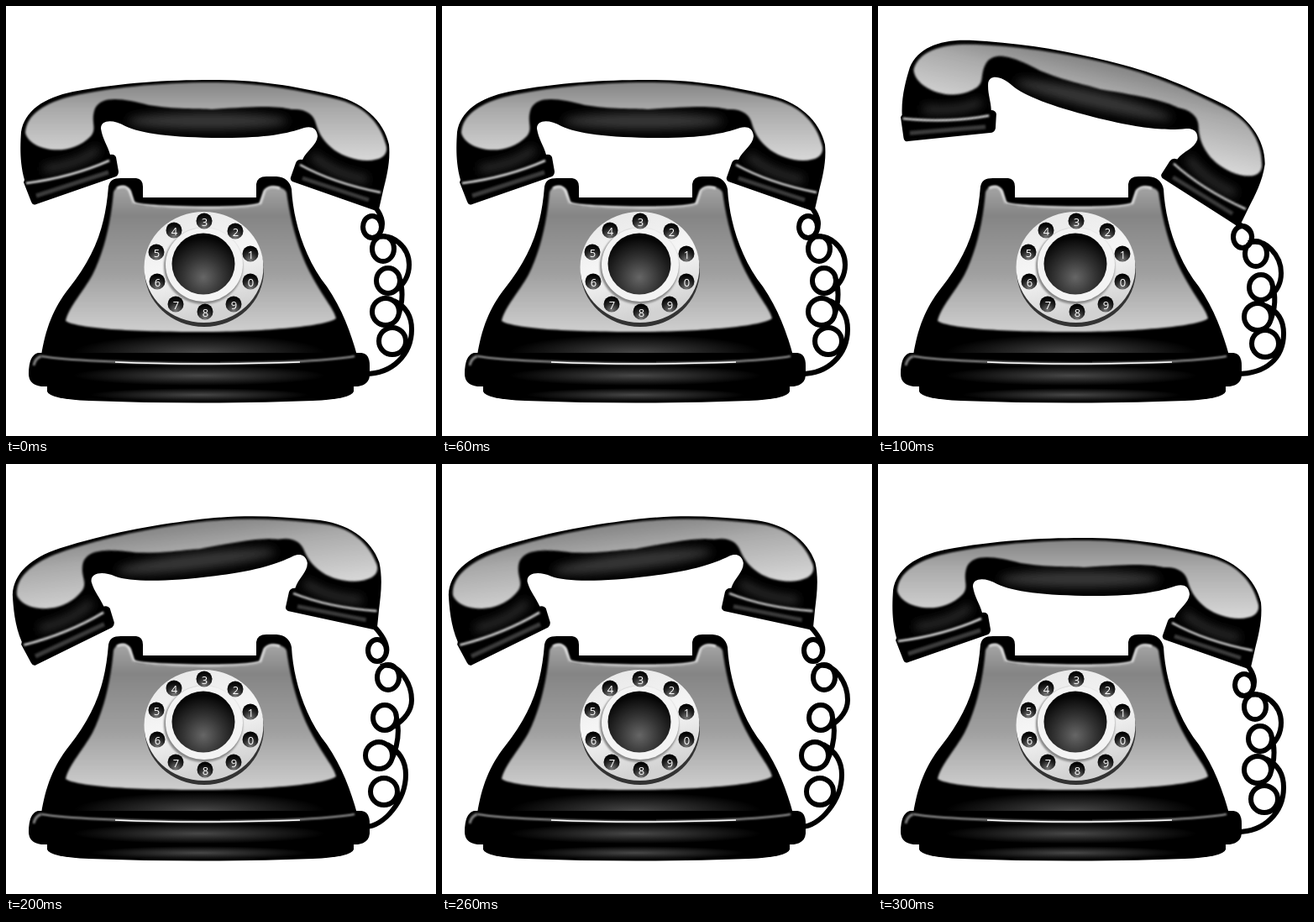
An HTML page for the animation above (400 ms loop, 512 by 512 pixels).

```html
<!DOCTYPE html>
<html lang="en">
<head>
<meta charset="utf-8">
<title>Ringing telephone</title>
<style>
  html, body { margin: 0; width: 100%; height: 100%; overflow: hidden; background: #fff; }
  svg { display: block; width: 100vw; height: 100vh; }
  text { font: 13px "Open Sans", sans-serif; fill: #fff; text-anchor: middle; }
</style>
</head>
<body>
<svg viewBox="0 0 512 512">
  <defs>
    <filter id="soft" x="-20%" y="-50%" width="140%" height="200%"><feGaussianBlur stdDeviation="1"/></filter>
    <filter id="glow" x="-30%" y="-100%" width="160%" height="300%"><feGaussianBlur stdDeviation="6"/></filter>
    <linearGradient id="panel" x2="0" y2="1">
      <stop stop-color="#a5a5a5"/><stop offset=".2" stop-color="#858585"/>
      <stop offset=".6" stop-color="#a0a0a0"/><stop offset="1" stop-color="#cfcfcf"/>
    </linearGradient>
    <linearGradient id="grip" x2="0" y2="1">
      <stop stop-color="#858585"/><stop offset=".35" stop-color="#aaa"/><stop offset="1" stop-color="#d8d8d8"/>
    </linearGradient>
    <linearGradient id="ring" x2=".3" y2="1">
      <stop stop-color="#e6e6e6"/><stop offset=".55" stop-color="#f6f6f6"/><stop offset="1" stop-color="#d2d2d2"/>
    </linearGradient>
    <radialGradient id="hub" cy=".72" r=".65">
      <stop stop-color="#666"/><stop offset=".5" stop-color="#333"/><stop offset="1" stop-color="#050505"/>
    </radialGradient>
    <radialGradient id="hole" cy=".9" r=".8">
      <stop stop-color="#777"/><stop offset=".6" stop-color="#222"/><stop offset="1" stop-color="#000"/>
    </radialGradient>
    <radialGradient id="sheen">
      <stop stop-color="#484848"/><stop offset="1" stop-color="#000"/>
    </radialGradient>
    <path id="bodyShape" d="M122 215C124 205 131 205 140 205H155Q163 206 163 215V228H298V212Q299 203 310 203H322Q337 204 340 218C342 255 355 300 382 334C400 360 411 390 418 416H42C47 385 56 360 75 336C105 298 118 265 122 215Z"/>
    <path id="gripShape" d="M22 207C16 186 17 165 18 150C22 125 45 109 80 102C140 91 190 88 245 88C300 88 340 95 385 105C425 113 450 137 456 165C458 185 453 204 449 220L444 242Q442 245 438 243L341 209Q338 207 339 204L345 187Q347 182 353 183C358 172 370 166 371 155C370 144 362 143 355 145C335 152 310 157 260 157C200 157 160 152 142 143C128 135 113 135 113 146C115 159 121 166 124 177Q129 176 131 180L134 197Q134 201 131 203L36 236Q32 238 30 233L21 210Z"/>
    <clipPath id="bodyClip"><use href="#bodyShape"/></clipPath>
    <clipPath id="gripClip"><use href="#gripShape"/></clipPath>
  </defs>

  <path id="cord" fill="none" stroke="#000" stroke-width="6"/>

  <g id="base">
    <use href="#bodyShape"/>
    <g clip-path="url(#bodyClip)">
      <ellipse cx="230" cy="413" rx="150" ry="22" fill="url(#sheen)"/>
      <path d="M128 222C131 212 145 213 149 221L152 235Q160 240 235 240Q295 240 302 236L307 222C311 213 330 213 334 222C338 250 346 290 366 325C380 350 391 362 393 372C380 382 300 388 232 388C150 388 85 384 71 375C75 358 92 340 103 320C118 290 125 255 128 222Z" fill="url(#panel)" filter="url(#soft)"/>
      <path d="M132 217Q142 212 147 220L152 234Q160 239 235 240Q295 240 303 235L308 220Q314 213 326 217" fill="none" stroke="#eee" stroke-width="2.5" filter="url(#soft)"/>
    </g>
    <path d="M49 448H414V459Q411 468 365 470Q230 475 99 470Q52 468 49 459Z"/>
    <ellipse cx="230" cy="463" rx="130" ry="8" fill="url(#sheen)"/>
    <path d="M38 413H423Q433 414 433 428V440Q432 451 419 453H42Q27 451 27 438Q27 416 38 413Z"/>
    <ellipse cx="230" cy="440" rx="150" ry="12" fill="url(#sheen)"/>
    <path d="M42 417Q85 424 230 426Q370 425 415 417" fill="none" stroke="#aaa" stroke-width="2" filter="url(#soft)"/>
    <path d="M130 424Q230 428 350 424" fill="none" stroke="#fff" stroke-width="1.5"/>
    <path d="M33 428Q35 419 42 417" fill="none" stroke="#888" stroke-width="3" filter="url(#soft)"/>
  </g>

  <g id="dial">
    <ellipse cx="236" cy="315" rx="71" ry="67" fill="#333"/>
    <ellipse cx="235.500" cy="311" rx="71" ry="66" fill="url(#ring)"/>
    <ellipse cx="235" cy="310" rx="47" ry="45" fill="#888" filter="url(#soft)"/>
    <ellipse cx="236" cy="308" rx="46" ry="44" fill="#f3f3f3"/>
    <ellipse cx="235" cy="307" rx="37.500" ry="36.500" fill="url(#hub)"/>
  </g>

  <g id="handset">
    <use href="#gripShape"/>
    <g clip-path="url(#gripClip)">
      <ellipse cx="240" cy="137" rx="95" ry="10" fill="#383838" filter="url(#glow)"/>
      <path d="M45 194Q85 190 110 170M365 178Q390 200 430 207" fill="none" stroke="#383838" stroke-width="8" filter="url(#glow)"/>
      <path d="M23 151C28 172 75 182 101 155C109 145 100 138 106 122C114 106 140 110 170 118C200 123 230 122 245 123C290 120 320 118 340 123C358 122 367 130 369 140C376 166 400 183 430 184C450 184 456 175 452 164C446 142 430 121 398 112C350 100 300 91 245 91C180 91 120 98 80 107C45 115 24 130 23 151Z" fill="url(#grip)" filter="url(#soft)"/>
      <path d="M24 211Q78 204 123 184M350 189Q390 211 446 222" fill="none" stroke="#ddd" stroke-width="2.500" filter="url(#soft)"/>
      <path d="M36 226L122 198M353 205L432 231" fill="none" stroke="#3a3a3a" stroke-width="5" filter="url(#soft)"/>
    </g>
  </g>
</svg>
<script>
const holes = [[291, 328], [291, 295], [273, 268], [236, 256], [200, 267],
               [179, 293], [180, 328], [202, 355], [237, 364], [271, 355]];
document.getElementById("dial").insertAdjacentHTML("beforeend", holes.map(([x, y], digit) =>
  `<circle cx="${x}" cy="${y}" r="9.5" fill="url(#hole)"/><text x="${x + .5}" y="${y + 6}">${digit}</text>`
).join(""));

// The handset turns around its lower right corner, at (445, 243) when level.
const poses = [
  { angle: 0, corner: [445, 243], bulges: [[480, 308], [483, 385]], end: 438,
    loops: [[436, 263], [449, 289], [455, 327], [452, 364], [460, 399]] },
  { angle: 13.3, corner: [432, 262], bulges: [[480, 318], [483, 390]], end: 438,
    loops: [[434, 275], [450, 295], [456, 335], [452, 370], [461, 402]] },
  { angle: -7, corner: [443, 196], bulges: [[483, 281], [476, 370]], end: 432,
    loops: [[442, 222], [455, 254], [451, 302], [444, 347], [450, 390]] }
];
const sequence = [0, 1, 2, 0];
const radii = [[11, 13], [13, 15], [14, 15], [16, 16], [16, 16]];

function ellipsePath([x, y], [rx, ry]) {
  return `M${x - rx} ${y}a${rx} ${ry} 0 1 0 ${2 * rx} 0a${rx} ${ry} 0 1 0 ${-2 * rx} 0`;
}

function cordPath({ loops, bulges: [[ax, ay], [bx, by]], corner, end }) {
  const [first, second, third, fourth, fifth] = loops;
  return loops.map((center, i) => ellipsePath(center, radii[i])).join("") +
    `M${corner[0] - 5} ${corner[1] - 3}Q${first[0] + 16} ${first[1] - 8} ${first[0] + 10} ${first[1] + 6}` +
    `M${second[0] - 9} ${second[1] - 13}C${second[0] + 12} ${second[1] - 20} ${ax} ${ay - 20} ${ax} ${ay}` +
    `Q${ax} ${ay + 18} ${third[0] + 10} ${third[1] + 11}` +
    `M${third[0] + 13} ${third[1] - 5}Q${third[0] + 21} ${(third[1] + fourth[1]) / 2} ${fourth[0] + 14} ${fourth[1] + 8}` +
    `M${fourth[0] + 10} ${fourth[1] - 13}Q${bx} ${by - 24} ${bx} ${by}` +
    `C${bx} ${by + 30} ${fifth[0]} ${end} 428 ${end}`;
}

const handset = document.getElementById("handset");
const cord = document.getElementById("cord");

function draw() {
  const step = Math.floor(performance.now() % 400 / 100);
  const pose = poses[sequence[step]];
  handset.setAttribute("transform", `translate(${pose.corner}) rotate(${pose.angle}) translate(-445 -243)`);
  cord.setAttribute("d", cordPath(pose));
  requestAnimationFrame(draw);
}
draw();
</script>
</body>
</html>
```
